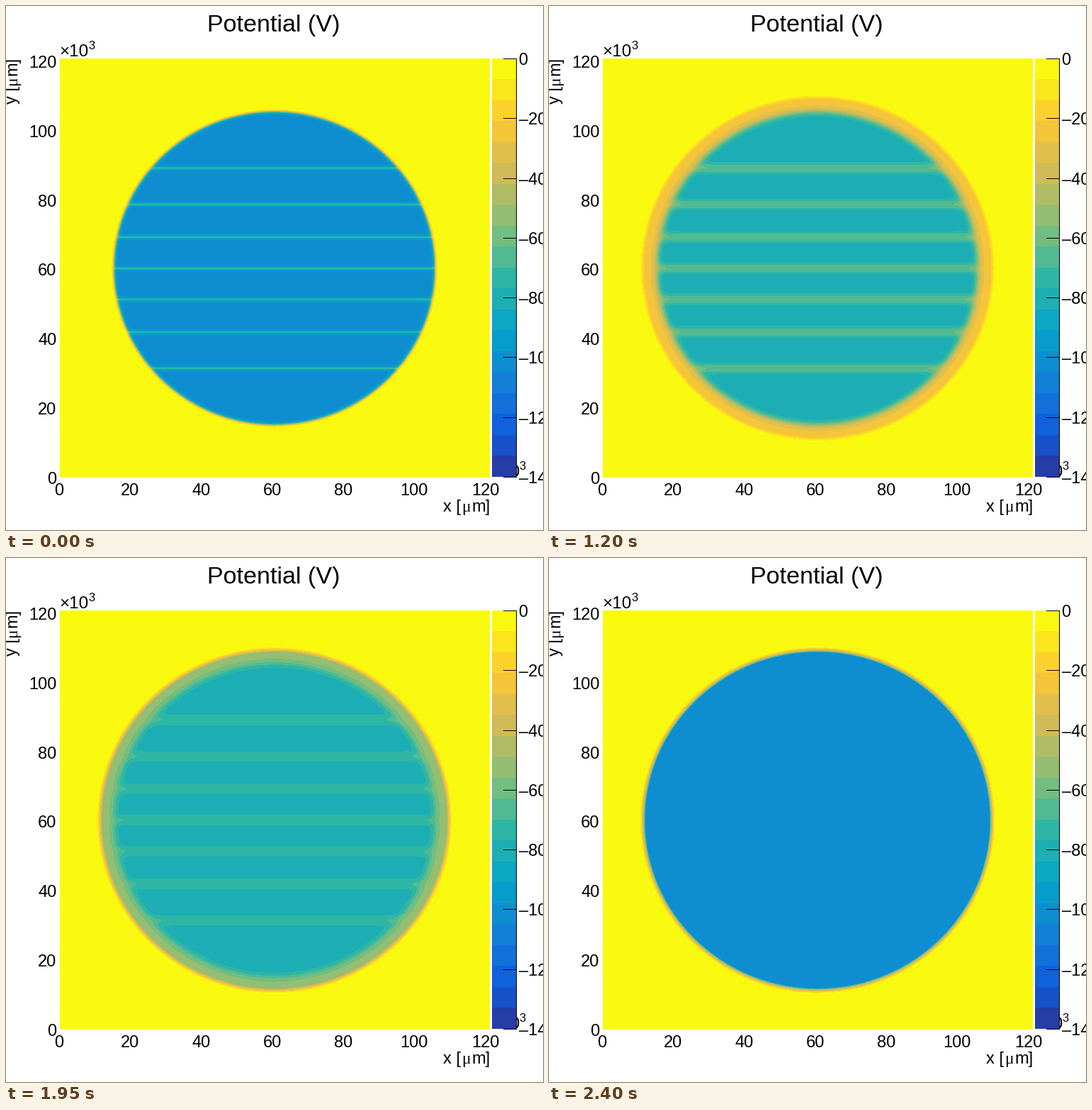
Animation of 758 by 739 pixels, one loop 2.55 s. Source, as a matplotlib script:

```python
import numpy as np
import matplotlib.pyplot as plt
from matplotlib.animation import FuncAnimation
from matplotlib.colors import LinearSegmentedColormap
from matplotlib.patches import Rectangle

W, H, DPI = 758, 739, 100
STEPS, HOLD = 49, 2
X0, X1, Y0, Y1 = 76, 683, 74, 665
CX, CY = 379, 369.8
X_UNIT, Y_UNIT = 5.0125, 4.884
R_STRIPS, R_RING, R_END = 226.8, 243.3, 251.3
BANDS, V_MAX, STRIPS = 20, 140, 8

# Colours from the lowest potential up to zero
cmap = LinearSegmentedColormap.from_list("volts", [
    "#352a87", "#0f5cdd", "#1481d6", "#06a4ca", "#2eb7a4",
    "#87bf77", "#d1bb59", "#fec832", "#f9fb0e"], N=1024)
PALETTE = cmap(np.floor((np.arange(BANDS) + 0.99) * 255 / BANDS) / 255)[:, :3]

# Cuts that divide the disc into strips of equal area
h = np.linspace(-1, 1, 2001)
area = np.arcsin(h) + h * np.sqrt(1 - h * h)
shares = np.pi * (np.arange(1, STRIPS) / STRIPS - 0.5)
GAPS = CY + 222.5 * np.interp(shares, area, h)

ys, xs = np.mgrid[Y0:Y1, X0:X1] + 0.5
radius = np.hypot(xs - CX, (ys - CY) * X_UNIT / Y_UNIT)
gap_dist = np.abs(ys[:, :1] - GAPS).min(axis=1)
gap_dist = np.maximum(gap_dist - 0.5, 0)[:, None]


def field(step):
    """Colours of the slice at one depth of the sensor."""
    t = min(step, STEPS - 1)
    u = t / (STEPS - 1)
    back = u ** 30  # steep rise next to the back contact
    core = 80 + 20 * np.exp(-t / 8.5) + 20 * back
    ring = 4.7 * np.log1p(np.exp((t - 10.5) / 2.5)) + 29 * back

    # The strips fade softly into the ring, the ring falls to zero outside
    soft = 1.2 + 1.8 * (1 - np.exp(-t / 9))
    edge = 1 / (1 + np.exp((radius - R_STRIPS) / soft))
    fall = np.clip((radius - R_RING) / (R_END - R_RING), 0, 1)
    volts = ring * (1 - fall ** (2 - 1.5 * u)) + (core - ring) * edge

    spread = min(2 * u, 1)
    gap = np.exp(-(gap_dist / (1.3 + 5.2 * spread)) ** (1 + spread))
    volts -= 27 * (1 - u) ** 0.6 * gap * edge

    band = np.floor((V_MAX - volts) * BANDS / V_MAX).astype(int)
    return PALETTE[np.clip(band, 0, BANDS - 1)]


plt.rcParams["font.family"] = "Liberation Sans"
fig = plt.figure(figsize=(W / DPI, H / DPI), dpi=DPI, facecolor="white")
ax = fig.add_axes([0, 0, 1, 1])
ax.axis("off")


def label(x, y, s, px=23.6, **kw):
    kw = {"ha": "left", "va": "baseline", "color": "black", "zorder": 2, **kw}
    ax.text(x, y, s, fontsize=px * 72 / DPI, rotation_mode="anchor", **kw)


def box(x, y, w, h):
    ax.add_patch(Rectangle((x, y), w, h, fc="black", lw=0, zorder=4,
                           antialiased=False))


def power_of_ten(x, y):
    label(x, y, "×10", 24.2)
    label(x + 40.5, y - 10, "3", 16.5)


def axis_title(letter, x, y, rotation=0):
    parts = ((0, letter + " [", "Liberation Sans"),
             (26.5, "μ", "Liberation Serif"), (40, "m]", "Liberation Sans"))
    for shift, s, family in parts:
        dx, dy = (0, -shift) if rotation else (shift, 0)
        label(x + dx, y + dy, s, family=family, rotation=rotation)


image = ax.imshow(field(0), extent=(X0, X1, Y1, Y0), interpolation="nearest",
                  aspect="auto", zorder=1)
ax.imshow(PALETTE[::-1, None], extent=(686, 720, 664, 74),
          interpolation="nearest", aspect="auto", zorder=3)
ax.set_xlim(0, W)
ax.set_ylim(H, 0)

label(378, 36, "Potential (V)", 34.2, ha="center")
for v in range(0, 121, 20):
    label(75 + v * X_UNIT, 690, str(v), ha="center")
    label(71.5, Y1 + 8.5 - v * Y_UNIT, str(v), ha="right")
power_of_ten(75.5, 71)
power_of_ten(684, 664)
axis_title("x", 617, 713)
axis_title("y", 15, 138.5, 90)

box(720, 74, 1, 591)
for v in range(0, V_MAX + 1, 20):
    y = 74 + round(v * 590 / V_MAX)
    box(702, y, 19, 1)
    label(723.5, y + 9, f"–{v}" if v else "0", zorder=4, clip_on=True)


def update(step):
    image.set_data(field(step))
    return [image]


anim = FuncAnimation(fig, update, frames=STEPS + HOLD, interval=50,
                     repeat=True, repeat_delay=0, blit=False)
plt.show()
```
